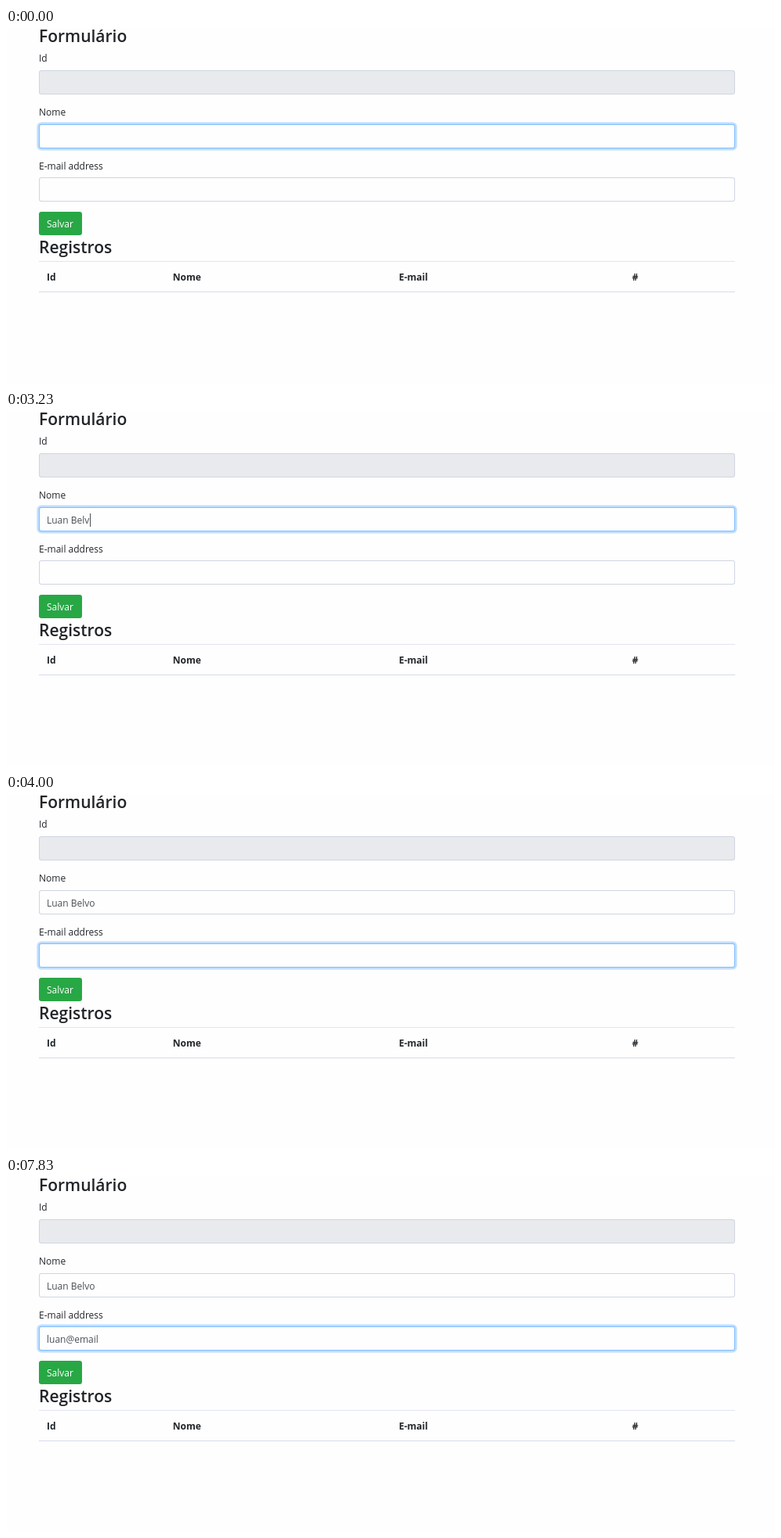
These frames come from a looping animation (981 px wide and 454 px high, 8000 ms). An HTML page with a canvas:

```html
<!DOCTYPE html>
<html lang="pt">
<head>
<meta charset="utf-8">
<title>Formulário</title>
<style>
  html, body { margin: 0; width: 100%; height: 100%; overflow: hidden; background: #fefefe; }
  canvas { display: block; width: 981px; height: 454px; }
</style>
</head>
<body>
<canvas></canvas>
<script>
const W = 981, H = 454, LOOP = 8000, BLINK = 530;
const LEFT = 42, RIGHT = 930, FIELD_H = 31, LABEL_X = 42, TEXT_X = 52;
const FAMILY = '"Open Sans", "Noto Sans", sans-serif';
const BODY = `12px ${FAMILY}`, BOLD = `700 12px ${FAMILY}`, HEADING = `600 21px ${FAMILY}`;
const PAPER = '#fefefe', INK = '#212529', INPUT_INK = '#495057';
const BORDER = [208, 213, 226], FOCUS_BORDER = [128, 189, 255];

// Each key time reveals one more character.
const nameField = {
  y: 123, text: 'Luan Belvo',
  keys: [1100, 1170, 2130, 2330, 2530, 2800, 2930, 3070, 3200, 3330]
};
const mailField = {
  y: 191, text: 'luan@email',
  keys: [4700, 4870, 5030, 5170, 5900, 6100, 6470, 6800, 7000, 7300]
};
const FOCUS_SWITCH = 3440, FADE = 150;
const CARET_START = 300 - 2 * BLINK, MAIL_CARET = 3470;

const canvas = document.querySelector('canvas');
const ctx = canvas.getContext('2d');
const scale = window.devicePixelRatio || 1;
canvas.width = W * scale;
canvas.height = H * scale;

function label(text, x, baseline, font = BODY, color = INK) {
  ctx.font = font;
  ctx.fillStyle = color;
  ctx.fillText(text, x, baseline);
}

function box(x, y, w, h, r, color) {
  ctx.beginPath();
  ctx.roundRect(x, y, w, h, r);
  ctx.fillStyle = color;
  ctx.fill();
}

function rule(y, color) {
  ctx.fillStyle = color;
  ctx.fillRect(LEFT, y, RIGHT - LEFT, 1);
}

const mix = (a, b, k) => `rgb(${a.map((v, i) => Math.round(v + (b[i] - v) * k))})`;

function field(y, focus, fill = PAPER) {
  const spread = 2.56 * focus;
  if (focus > 0) {
    box(LEFT - spread, y - spread, RIGHT - LEFT + 2 * spread, FIELD_H + 2 * spread,
      3.2 + spread, `rgba(0, 123, 255, ${0.25 * focus})`);
  }
  box(LEFT, y, RIGHT - LEFT, FIELD_H, 3.2, mix(BORDER, FOCUS_BORDER, focus));
  box(LEFT + 1, y + 1, RIGHT - LEFT - 2, FIELD_H - 2, 2.2, fill);
}

// Approximates the CSS "ease-in-out" curve.
const ease = k => k * k * (3 - 2 * k);

function typed({ text, keys }, t) {
  return text.slice(0, keys.filter(k => k <= t).length);
}

function drawCaret(input, start, t) {
  const last = Math.max(start, ...input.keys.filter(k => k <= t));
  if (Math.floor((t - last) / BLINK) % 2) return;
  ctx.font = BODY;
  const x = Math.round(TEXT_X + 0.5 + ctx.measureText(typed(input, t)).width);
  ctx.fillStyle = INPUT_INK;
  ctx.fillRect(x, input.y + 8, 1, 17);
}

function draw(t) {
  ctx.setTransform(scale, 0, 0, scale, 0, 0);
  ctx.fillStyle = PAPER;
  ctx.fillRect(0, 0, W, H);

  label('Formulário', LABEL_X, 18, HEADING);
  label('Id', LABEL_X, 43);
  label('Nome', LABEL_X, 112);
  label('E-mail address', LABEL_X, 180.5);

  const shift = ease(Math.min(1, Math.max(0, (t - FOCUS_SWITCH) / FADE)));
  field(54, 0, '#e8eaed');
  field(nameField.y, 1 - shift);
  field(mailField.y, shift);
  for (const input of [nameField, mailField]) {
    label(typed(input, t), TEXT_X, input.y + 21, BODY, INPUT_INK);
  }
  if (t < FOCUS_SWITCH) drawCaret(nameField, CARET_START, t);
  else if (t >= MAIL_CARET) drawCaret(mailField, MAIL_CARET, t);

  box(LEFT, 235, 55, 30, 3.2, '#28a745');
  label('Salvar', TEXT_X, 255, BODY, '#fff');

  label('Registros', LABEL_X, 287.5, HEADING);
  rule(298, '#e2e5f2');
  rule(337, '#d6daea');
  for (const [text, x] of [['Id', 52], ['Nome', 212.7], ['E-mail', 501.2], ['#', 798.8]]) {
    label(text, x, 323, BOLD);
  }
}

const begin = performance.now();
function tick() {
  draw((performance.now() - begin) % LOOP);
  requestAnimationFrame(tick);
}
tick();
</script>
</body>
</html>
```
